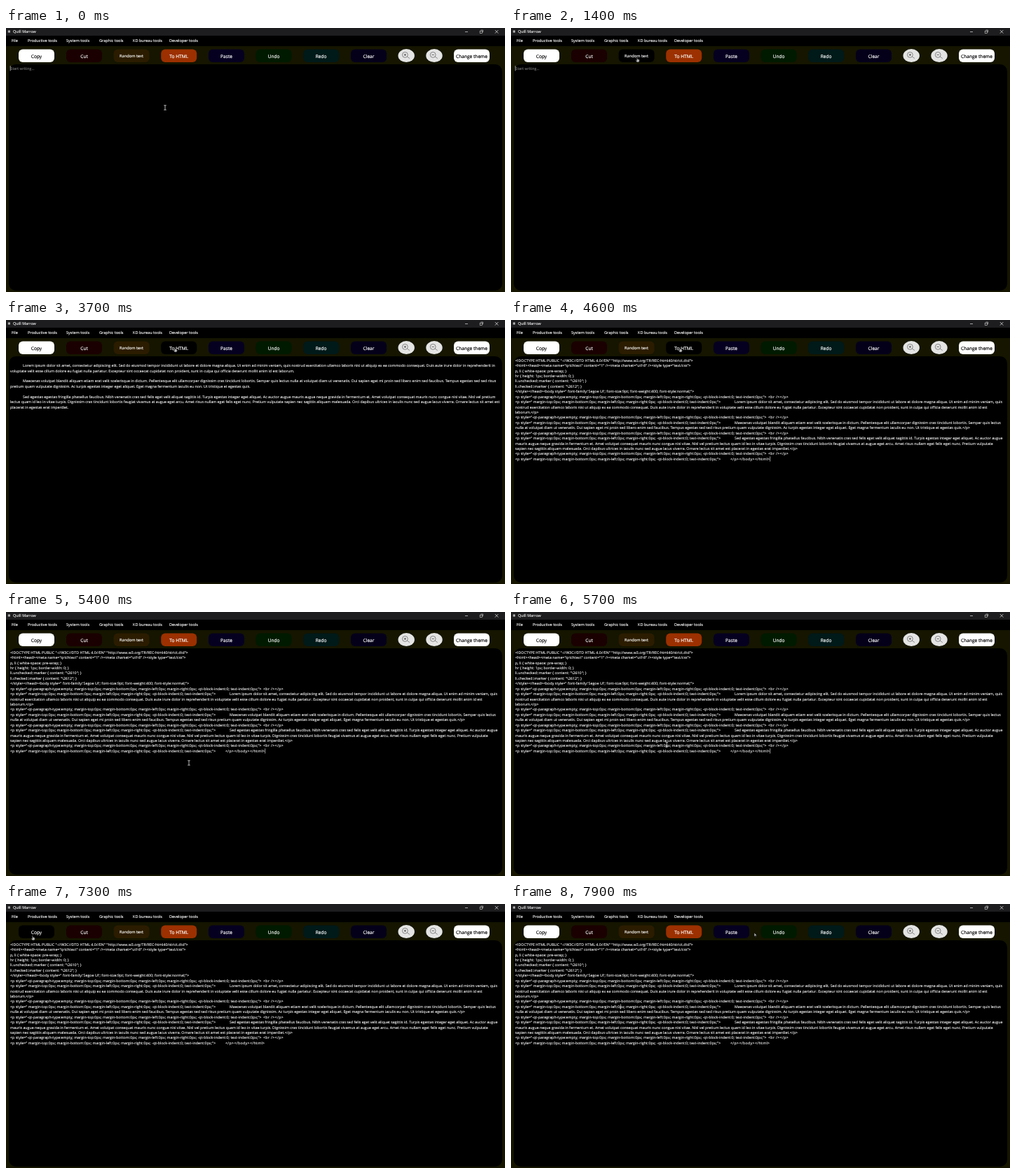
Recreate the animation shown at these times as an HTML page with a canvas. Size 712 by 378 pixels, loop 8000 ms.

```html
<!DOCTYPE html>
<html lang="en">
<head>
<meta charset="utf-8">
<title>Text editor</title>
<style>
html, body { margin: 0; width: 100%; height: 100%; overflow: hidden; background: #000; }
canvas { display: block; width: 712px; height: 378px; }
</style>
</head>
<body>
<canvas id="stage"></canvas>
<script>
const W = 712, H = 378, LOOP = 8000;
const canvas = document.getElementById('stage');
const ctx = canvas.getContext('2d');
const dpr = window.devicePixelRatio || 1;
canvas.width = W * dpr;
canvas.height = H * dpr;

const FONT = '"Open Sans", "Noto Sans", sans-serif';
const BODY = 5.256, CODE_GAP = 0.035, TAG_GAP = 0.32, LEFT = 6, TOP = 57.8, ROW = 7.43;

// "|" breaks a line in the plain view, "^" in the markup view.
const paragraphs = [
  'Lorem ipsum dolor sit amet, consectetur adipiscing elit. Sed do eiusmod tempor incididunt ut labore et dolore magna aliqua. Ut enim ad minim veniam, quis^nostrud exercitation ullamco laboris nisi ut aliquip ex ea commodo consequat. Duis aute irure dolor in reprehenderit in|voluptate velit esse cillum dolore eu fugiat nulla pariatur. Excepteur sint occaecat cupidatat non proident, sunt in culpa qui officia deserunt mollit anim id est^laborum.',
  'Maecenas volutpat blandit aliquam etiam erat velit scelerisque in dictum. Pellentesque elit ullamcorper dignissim cras tincidunt lobortis. Semper quis lectus^nulla at volutpat diam ut venenatis. Dui sapien eget mi proin sed libero enim sed faucibus. Tempus egestas sed sed risus|pretium quam vulputate dignissim. Ac turpis egestas integer eget aliquet. Eget magna fermentum iaculis eu non. Ut tristique et egestas quis.',
  'Sed egestas egestas fringilla phasellus faucibus. Nibh venenatis cras sed felis eget velit aliquet sagittis id. Turpis egestas integer eget aliquet. Ac auctor augue^mauris augue neque gravida in fermentum et. Amet volutpat consequat mauris nunc congue nisi vitae. Nisl vel pretium|lectus quam id leo in vitae turpis. Dignissim cras tincidunt lobortis feugiat vivamus at augue eget arcu. Amet risus nullam eget felis eget nunc. Pretium vulputate^sapien nec sagittis aliquam malesuada. Orci dapibus ultrices in iaculis nunc sed augue lacus viverra. Ornare lectus sit amet est|placerat in egestas erat imperdiet.'
];
const breakAt = (text, mark, other) => text.replaceAll(other, ' ').split(mark);

// A row is a list of [x, text, letter gap].
const plainRows = [];
for (const p of paragraphs) {
  plainRows.push([]);
  breakAt(p, '|', '^').forEach((line, i) => plainRows.push([[i ? LEFT : 24, line, 0]]));
}

const margins = 'margin-top:0px; margin-bottom:0px; margin-left:0px; margin-right:0px; -qt-block-indent:0; text-indent:0px;">';
const openTag = [LEFT, '<p style=" ' + margins, CODE_GAP];
const emptyRow = [[LEFT, '<p style="-qt-paragraph-type:empty; ' + margins, CODE_GAP], [367, '<br /></p>', TAG_GAP]];
const codeRows = [
  '<!DOCTYPE HTML PUBLIC "-//W3C//DTD HTML 4.0//EN" "http://www.w3.org/TR/REC-html40/strict.dtd">',
  '<html><head><meta name="qrichtext" content="1" /><meta charset="utf-8" /><style type="text/css">',
  'p, li { white-space: pre-wrap; }',
  'hr { height: 1px; border-width: 0; }',
  'li.unchecked::marker { content: "\\2610"; }',
  'li.checked::marker { content: "\\2612"; }',
  '</style></head><body style=" font-family:\'Segoe UI\'; font-size:9pt; font-weight:400; font-style:normal;">'
].map(line => [[LEFT, line, CODE_GAP]]);
for (const p of paragraphs) {
  codeRows.push(emptyRow);
  breakAt(p + '</p>', '^', '|').forEach((line, i) =>
    codeRows.push(i ? [[LEFT, line, 0]] : [openTag, [319, line, 0]]));
}
codeRows.push(emptyRow, [openTag, [313, '</p></body></html>', TAG_GAP]]);

const menu = [[8, 'File'], [31, 'Productive tools'], [86, 'System tools'], [133, 'Graphic tools'], [181, 'KD bureau tools'], [233, 'Developer tools']];
const buttons = [
  [18, 'Copy', '#fff'], [86, 'Cut', '#1a0000'], [153.6, 'Random text', '#2b1c00', 5.7],
  [221.2, 'To HTML', '#9c3000'], [289, 'Paste', '#060020'], [356.6, 'Undo', '#001a00'],
  [424.2, 'Redo', '#001919'], [492, 'Clear', '#05001a'], [639, 'Change theme', '#fff']
];

// Pointer path: time, x, y.
const path = [
  [0, 227, 114], [1000, 227, 114], [1400, 180, 42], [2100, 180, 42], [2300, 220, 95],
  [2600, 220, 95], [3100, 242, 128], [3600, 242, 128], [3700, 241, 39], [4600, 241, 39],
  [5400, 261, 216], [5500, 261, 216], [6000, 151, 142], [6500, 151, 142],
  [7200, 38, 45], [7400, 38, 45], [7600, 156, 147], [7900, 347, 41]
];

function pointerAt(t) {
  const i = path.findIndex(k => k[0] > t);
  if (i < 0) return path[path.length - 1].slice(1);
  const [t0, x0, y0] = path[i - 1], [t1, x1, y1] = path[i];
  let u = (t - t0) / (t1 - t0);
  u = u * u * (3 - 2 * u);
  return [x0 + (x1 - x0) * u, y0 + (y1 - y0) * u];
}

const between = (t, a, b) => t >= a && t < b;

function setFont(size, gap) {
  ctx.font = `${size * 10}px ${FONT}`;
  ctx.letterSpacing = `${gap * 10}px`;
}

// Laid out ten times larger so that small type keeps exact advances;
// the thin outline keeps the strokes bright at this size.
function text(str, x, y, size, color, align = 'left', gap = 0) {
  ctx.save();
  ctx.translate(x, y + size * 0.36);
  ctx.scale(0.1, 0.1);
  setFont(size, gap);
  ctx.textAlign = align;
  ctx.fillStyle = ctx.strokeStyle = color;
  ctx.lineWidth = size * 0.25;
  ctx.lineJoin = 'round';
  ctx.fillText(str, 0, 0);
  ctx.strokeText(str, 0, 0);
  ctx.restore();
}

function textWidth(str, size, gap) {
  ctx.save();
  setFont(size, gap);
  const w = ctx.measureText(str).width / 10;
  ctx.restore();
  return w;
}

function rect(x, y, w, h, color) {
  ctx.fillStyle = color;
  ctx.fillRect(x, y, w, h);
}

function round(x, y, w, h, r, color) {
  ctx.beginPath();
  ctx.roundRect(x, y, w, h, r);
  ctx.fillStyle = color;
  ctx.fill();
}

function stroke(points, color, width) {
  ctx.beginPath();
  points.forEach(([x, y], i) => i % 2 ? ctx.lineTo(x, y) : ctx.moveTo(x, y));
  ctx.strokeStyle = color;
  ctx.lineWidth = width;
  ctx.stroke();
}

function polygon(x, y, points) {
  ctx.beginPath();
  points.forEach(([dx, dy]) => ctx.lineTo(x + dx, y + dy));
  ctx.closePath();
  ctx.fillStyle = '#bbb';
  ctx.strokeStyle = '#111';
  ctx.lineWidth = 0.7;
  ctx.fill();
  ctx.stroke();
}

function drawBars() {
  rect(0, 0, W, H, '#151500');
  rect(0, 0, W, 11, '#1d1d1f');
  rect(0, 11, W, 15, '#000');
  rect(2.8, 3.4, 3.2, 3.2, '#aaa');
  text('Quill Marrow', 10, 5.5, 5.45, '#eee');
  stroke([[655, 5.5], [659, 5.5]], '#ddd', 0.7);
  stroke([[697.8, 3], [702.4, 7.6], [702.4, 3], [697.8, 7.6]], '#eee', 0.7);
  ctx.lineWidth = 0.6;
  ctx.strokeStyle = '#ddd';
  ctx.strokeRect(676.2, 4.2, 3.2, 3.2);
  stroke([[677.4, 3], [680.6, 3], [680.6, 3], [680.6, 6.2]], '#ddd', 0.6);
  for (const [x, label] of menu) text(label, x, 18, 5.58, '#fff');
}

function drawZoom(x, plus) {
  ctx.beginPath();
  ctx.ellipse(x, 39.6, 11.7, 9.5, 0, 0, 7);
  ctx.fillStyle = '#e4e4e4';
  ctx.fill();
  const lx = x - 1.8, ly = 38.4;
  ctx.beginPath();
  ctx.arc(lx, ly, 3.9, 0, 7);
  ctx.strokeStyle = '#444';
  ctx.lineWidth = 0.6;
  ctx.stroke();
  stroke([[lx - 1.6, ly], [lx + 1.6, ly]], '#333', 0.7);
  if (plus) stroke([[lx, ly - 1.6], [lx, ly + 1.6]], '#333', 0.7);
  stroke([[lx + 3, ly + 2.6], [lx + 6.6, ly + 5.2]], '#666', 0.7);
}

function hovered(x, mx, my) {
  return mx >= x && mx <= x + 51 && my >= 30 && my <= 49;
}

function drawButtons(mx, my) {
  for (const [x, label, color, size = 6.6] of buttons) {
    const hover = hovered(x, mx, my);
    round(x, 30.4, 51, 18.6, 6, hover ? '#000' : color);
    text(label, x + 25.5, 40.2, size, color === '#fff' && !hover ? '#000' : '#fff', 'center');
  }
  drawZoom(571.2, true);
  drawZoom(611, false);
}

function drawRows(rows, y, selected) {
  rows.forEach((row, i) => {
    const ry = y + i * ROW;
    if (selected) {
      const [x, str, gap] = row[row.length - 1];
      rect(LEFT, ry - ROW / 2, x + textWidth(str, BODY, gap) - LEFT + 0.5, ROW, '#780006');
    }
    for (const [x, str, gap] of row) text(str, x, ry, BODY, '#f4f4f4', 'left', gap);
  });
}

function caret(x, y) {
  rect(x, y - 3.6, 0.7, 7.2, '#ddd');
}

function drawPage(t) {
  round(4, 52, 704, 324, 10, '#000');
  if (t < 1800) {
    text('Start writing...', 6.5, TOP, BODY, '#777');
    if (t < 200 || t >= 1100) caret(5.8, TOP);
  } else if (t < 4600) {
    drawRows(plainRows, TOP, false);
  } else {
    const selected = between(t, 6000, 7200);
    drawRows(codeRows, TOP, selected);
    if (t < 5900) caret(369.4, TOP + 19 * ROW);
    if (selected) caret(5.8, TOP);
    if (t >= 7600) caret(156, TOP + 12 * ROW);
  }
}

function drawPointer(x, y) {
  if (y > 52) {
    const bar = [[x, y - 3.2], [x, y + 3.2], [x - 1.8, y - 3.2], [x + 1.8, y - 3.2], [x - 1.8, y + 3.2], [x + 1.8, y + 3.2]];
    stroke(bar, '#ddd', 0.8);
  } else if (buttons.some(b => hovered(b[0], x, y))) {
    polygon(x, y, [[-0.7, 0], [0.5, 0], [0.6, 2.4], [3.2, 3.2], [3.2, 5.4], [2.5, 7], [-0.4, 7], [-2.2, 4.6], [-1.7, 4], [-0.7, 4.8]]);
  } else {
    polygon(x, y, [[0, 0], [0, 5.8], [1.4, 4.6], [2.2, 6.6], [3, 6.2], [2.2, 4.3], [4, 4.2]]);
  }
}

function draw(t) {
  const [mx, my] = pointerAt(t);
  ctx.setTransform(dpr, 0, 0, dpr, 0, 0);
  ctx.textRendering = 'geometricPrecision';
  drawBars();
  drawButtons(mx, my);
  drawPage(t);
  drawPointer(mx, my);
}

const start = performance.now();
function tick() {
  const t = (performance.now() - start) % LOOP;
  draw(Math.floor(t / 100) * 100);
  requestAnimationFrame(tick);
}
tick();
</script>
</body>
</html>
```
